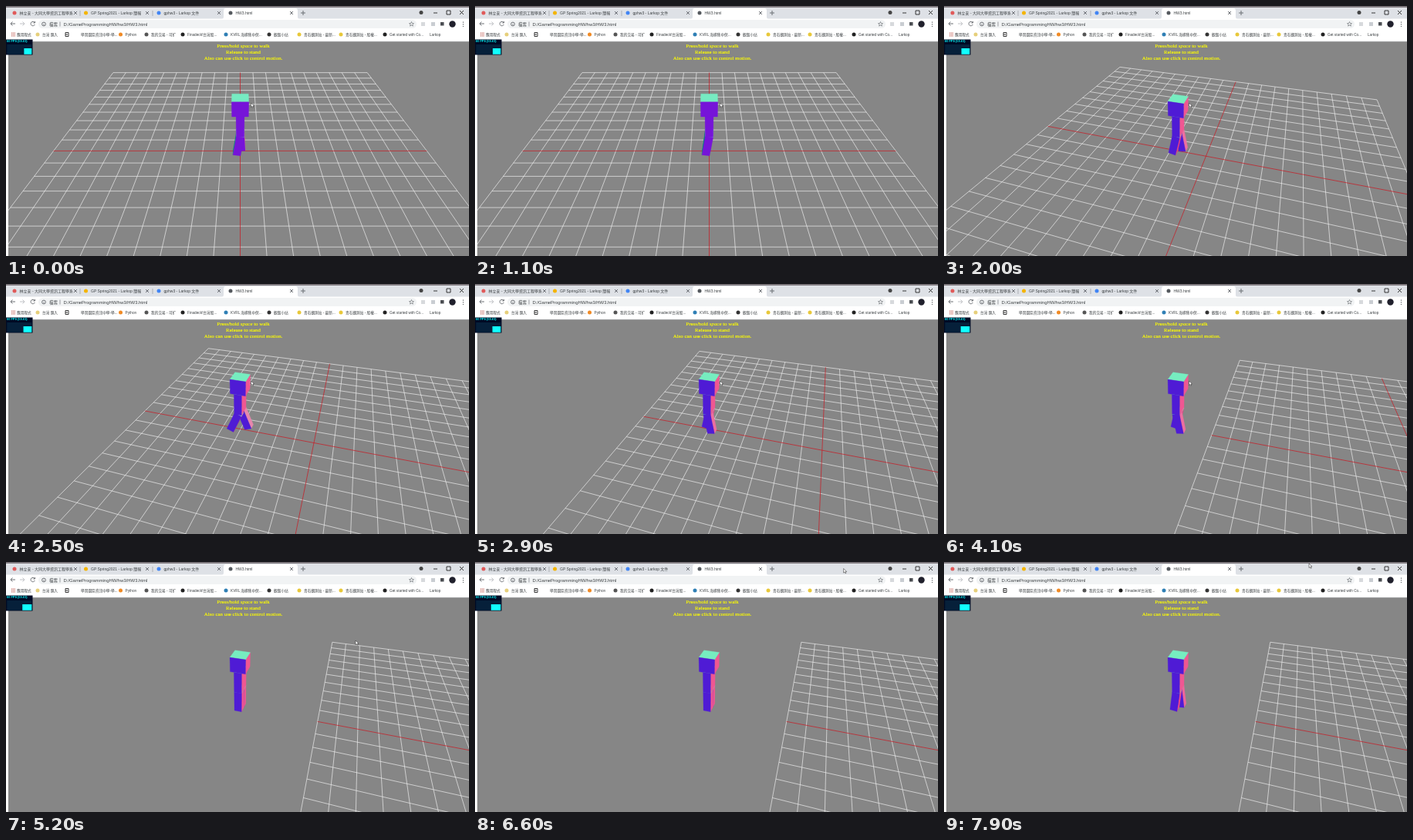
An HTML page with a canvas for the animation above (8000 ms loop, 600x325 px).

```html
<!DOCTYPE html>
<html lang="zh-Hant">
<head>
<meta charset="utf-8">
<title>HW3.html</title>
<style>
  html, body { margin: 0; width: 600px; height: 325px; overflow: hidden; background: #fff; }
  canvas, svg { position: absolute; left: 0; top: 0; width: 600px; height: 325px; }
  text { font-family: "Liberation Sans", "Noto Sans CJK TC", "Noto Sans CJK", sans-serif; fill: #3c4043; white-space: pre; }
  .hint { font: 6.900px "Liberation Serif", serif; fill: #ff0; stroke: #ff0; stroke-width: .15; text-anchor: middle; }
  .icon { fill: none; stroke: #5f6368; stroke-width: .9; }
</style>
</head>
<body>
<canvas id="stage" width="600" height="325"></canvas>
<svg id="ui" viewBox="0 0 600 325">
  <rect width="600" height="17" fill="#dee1e6"/>
  <rect width="600" height="2" fill="#7d787d"/>
  <path d="M279 17q3 0 3-3V6q0-3 3-3h90q3 0 3 3v8q0 3 3 3z" fill="#fff"/>
  <path d="M96 6v7M190 6v7" stroke="#8b8f94" stroke-width=".6"/>
  <rect y="16.500" width="600" height="29.500" fill="#fff"/>
  <rect x="42" y="18" width="490" height="11" rx="5.500" fill="#f1f3f4"/>
  <path d="M0 46h600" stroke="#d5d7da" stroke-width=".6"/>

  <g class="icon">
    <path d="M88 7l4 4m0-4l-4 4M181 7l4 4m0-4l-4 4M274 7l4 4m0-4l-4 4M368 7l4 4m0-4l-4 4M382 9h6m-3-3v6"/>
    <path d="M554 9h5M571 6h5v5h-5zM588 6l5 5m0-5l-5 5" stroke="#222"/>
    <path d="M12 23H6m2.500-2.500L6 23l2.500 2.500"/>
    <path d="M18 23h6m-2.500-2.500L24 23l-2.500 2.500" stroke="#b9bcc0"/>
    <path d="M37 21.500a2.700 2.700 0 1 0 .3 2.500M37.500 20v2h-2"/>
    <circle cx="49" cy="23.500" r="2.400"/><path d="M49 23v2M70 20.500v6" stroke-width=".6"/>
    <path d="M525.500 20.500l.9 2 2.100.1-1.700 1.400.6 2.100-1.900-1.200-1.900 1.200.6-2.100-1.700-1.400 2.100-.1z" stroke-width=".6"/>
    <path d="M77 34.500h4v5h-4zM77 37h3" stroke="#222"/>
  </g>
  <circle cx="538" cy="8.500" r="2.500" fill="#444"/>
  <rect x="538" y="21" width="5" height="5" fill="#d7d9dc"/>
  <rect x="551" y="21" width="5" height="5" fill="#c9cdd2"/>
  <rect x="563" y="21" width="4.500" height="4.500" fill="#4a4d52"/>
  <circle cx="578.500" cy="23.500" r="4.200" fill="#20202c"/>
  <path d="M592.500 20.500v7" stroke="#5f6368" stroke-width="1.200" stroke-dasharray="1.200 1.500"/>
  <path d="M7 35h5m-5 2h5m-5 2h5" stroke="#c05a50" stroke-width="1.200" stroke-dasharray="1.200 .7"/>

  <text class="hint" x="307.500" y="54">Press/hold <tspan font-style="italic">space</tspan> to walk</text>
  <text class="hint" x="307.500" y="62">Release to stand</text>
  <text class="hint" x="307.500" y="70">Also can use click to control motion.</text>

  <rect y="43.500" width="34.500" height="20" fill="#000a24"/>
  <text x="1" y="47.300" style="font:bold 3.900px 'Liberation Sans',sans-serif;fill:#0ff">60 FPS (59-61)</text>
  <rect x="1.300" y="50" width="32" height="12.800" fill="#06203a"/>
  <rect id="graph" y="55" height="7.800" fill="#1ff"/>
  <path id="cursor" d="M0 0v5.600l1.300-1.200 1 2 .9-.4-.9-2h1.700z" fill="#fff" stroke="#222" stroke-width=".5"/>
</svg>
<script>
const $ = id => document.getElementById(id);
const ui = $('ui'), g = $('stage').getContext('2d');

function add(tag, attrs, text = '') {
  const el = document.createElementNS('http://www.w3.org/2000/svg', tag);
  for (const k in attrs) el.setAttribute(k, attrs[k]);
  el.textContent = text;
  ui.insertBefore(el, $('cursor'));
}
const label = (x, y, size, text) => add('text', { x, y, 'font-size': size }, text);
const dot = (cx, cy, fill) => add('circle', { cx, cy, r: 2.5, fill });

const tabs = [
  [17.5, '林立安 - 大同大學資訊工程學系', '#e05a5a'],
  [110, 'GP Spring2021 - Larkop 簡報', '#f4b400'],
  [204.5, 'gphw3 - Larkop 文件', '#4285f4'],
  [297.5, 'HW3.html', '#55595e']
];
for (const [x, text, color] of tabs) {
  label(x, 10.8, 5, text);
  dot(x - 6.5, 9, color);
}
label(56, 25.6, 5.4, '檔案');
label(74.5, 25.6, 5.9, 'D:/GameProgrammingHW/hw3/HW3.html');

const marks = [
  [14, '應用程式'], [47, '台灣 匯入', '#e6cf7a'], [97, '學習園區資訊中學-學...'],
  [154.5, 'Python', '#f08a24'], [188, '我的交易 - 可扩', '#555'],
  [235, 'Finadeck!台灣股...', '#222'], [291, 'KVRL 海嶼集中保...', '#2f7fb5'],
  [347, '觀盤小站', '#333'], [386, '青石觀測站 - 最新...', '#e8c83a'],
  [440, '青石觀測站 - 股權...', '#e8c83a'], [497, 'Get started with Co...', '#222'],
  [549, 'Larkop']
];
for (const [x, text, color] of marks) {
  label(x, 38.8, 4.7, text);
  if (color) dot(x - 6, 37, color);
}

// Camera: looks at the walker from a fixed offset
const LOOP = 8000, FOCAL = 405, CX = 303.5, CY = 188.4;
const clamp = (v, a, b) => Math.min(b, Math.max(a, v));
const dotp = (a, b) => a[0] * b[0] + a[1] * b[1] + a[2] * b[2];
const unit = a => a.map(v => v / Math.hypot(...a));
const cross = (a, b) => [a[1] * b[2] - a[2] * b[1], a[2] * b[0] - a[0] * b[2], a[0] * b[1] - a[1] * b[0]];
let cam;

function aim(side, targetX) {
  const eye = [side, 103.5, 131.6];
  const back = unit(eye), right = unit(cross([0, 1, 0], back));
  cam = { eye, back, right, up: cross(back, right), dist: Math.hypot(...eye), targetX };
}

// Points are relative to the walker
function project(p) {
  const k = FOCAL / (cam.dist - dotp(p, cam.back));
  return [CX + k * dotp(p, cam.right), CY - k * dotp(p, cam.up)];
}

function line(x1, z1, x2, z2, color) {
  g.strokeStyle = color;
  g.beginPath();
  g.moveTo(...project([x1 - cam.targetX, 0, z1]));
  g.lineTo(...project([x2 - cam.targetX, 0, z2]));
  g.stroke();
}

function grid() {
  g.lineWidth = 0.7;
  for (const red of [false, true]) {
    for (let i = -100; i <= 100; i += 10) {
      if ((i === 0) !== red) continue;
      const color = red ? '#cc1620' : '#ececec';
      line(i, -100, i, 100, color);
      line(-100, i, 100, i, color);
    }
  }
}

// Colour from the view-space normal, with raised contrast
function shade(normal) {
  const [r, u, b] = [cam.right, cam.up, cam.back].map(a => 127.5 + 127.5 * dotp(normal, a));
  return `rgb(${[r - 10, u * 1.2 - 38, b - 12].map(v => Math.round(clamp(v, 0, 255)))})`;
}

// Box hanging from its top centre, swung in the x-y plane
function box(top, z, w, h, d, swing = 0) {
  const s = Math.sin(swing), c = Math.cos(swing);
  const turn = ([x, y, q]) => [x * c - y * s, x * s + y * c, q];
  const place = p => { const r = turn(p); return [r[0], r[1] + top, r[2] + z]; };
  const half = [w / 2, h / 2, d / 2];
  for (let axis = 0; axis < 3; axis++) {
    for (const sign of [-1, 1]) {
      const n = [0, 0, 0];
      n[axis] = sign;
      const b = (axis + 1) % 3, e = (axis + 2) % 3;
      const pts = [[-1, -1], [1, -1], [1, 1], [-1, 1]].map(([u, v]) => {
        const p = [0, 0, 0];
        p[axis] = sign * half[axis];
        p[b] = u * half[b];
        p[e] = v * half[e];
        p[1] -= h / 2;
        return place(p);
      });
      const normal = turn(n);
      if (dotp(normal, cam.eye.map((v, i) => v - pts[0][i])) <= 0) continue;
      g.fillStyle = g.strokeStyle = shade(normal);
      g.lineWidth = 0.3;
      g.beginPath();
      pts.forEach(p => g.lineTo(...project(p)));
      g.closePath();
      g.fill();
      g.stroke();
    }
  }
}

// Front and back leg angles; lag is the back leg's phase in turns
const WALK = 1680, STOP = 4575, AGAIN = 7230, STRIDE = 600;
function legs(t) {
  const pair = (start, deg, lag) => [0, lag].map(shift =>
    -deg * Math.PI / 180 * Math.sin(((t - start) / STRIDE + shift) * 2 * Math.PI));
  if (t < WALK) return pair(-200, 10, 0.22);
  if (t < STOP) return pair(2350, 22, 0.5);
  return t < AGAIN ? [0, 0] : pair(AGAIN, 10, 0.5);
}

const path = [
  [0, 317.5, 126], [4600, 317.5, 126], [5200, 453, 102], [5400, 500, 50],
  [5900, 524, 8], [6500, 478, 9], [7900, 473, 2]
];
function cursorAt(t) {
  const i = Math.max(1, path.findIndex(p => p[0] >= t));
  const a = path[i - 1], b = path[i], k = (t - a[0]) / (b[0] - a[0]);
  return [a[1] + (b[1] - a[1]) * k, a[2] + (b[2] - a[2]) * k];
}

function draw(t) {
  const slide = clamp((t - 1200) / (WALK - 1200), 0, 1);
  const walked = (clamp(t, WALK, STOP) - WALK) * 0.0491;
  aim(41.6 * slide, -walked);

  g.clearRect(0, 0, 600, 325);
  g.save();
  g.beginPath();
  g.rect(3, 46, 597, 279);
  g.clip();
  g.fillStyle = '#868686';
  g.fillRect(3, 46, 597, 279);
  grid();
  const [front, rear] = legs(t);
  box(12, -2, 4, 12, 4, rear);
  box(12, 2, 4, 12, 4, front);
  box(24, 0, 4, 12, 8);
  box(32, 0, 8, 8, 8);
  g.restore();

  const left = 23.4 - 0.43 * Math.floor(t / 1000);
  $('graph').setAttribute('x', left);
  $('graph').setAttribute('width', 33.3 - left);
  $('cursor').setAttribute('transform', `translate(${cursorAt(t)})`);
}

const begin = performance.now();
function tick() {
  const t = (performance.now() - begin) % LOOP;
  draw(Math.floor(t / 100) * 100);
  requestAnimationFrame(tick);
}
tick();
</script>
</body>
</html>
```
